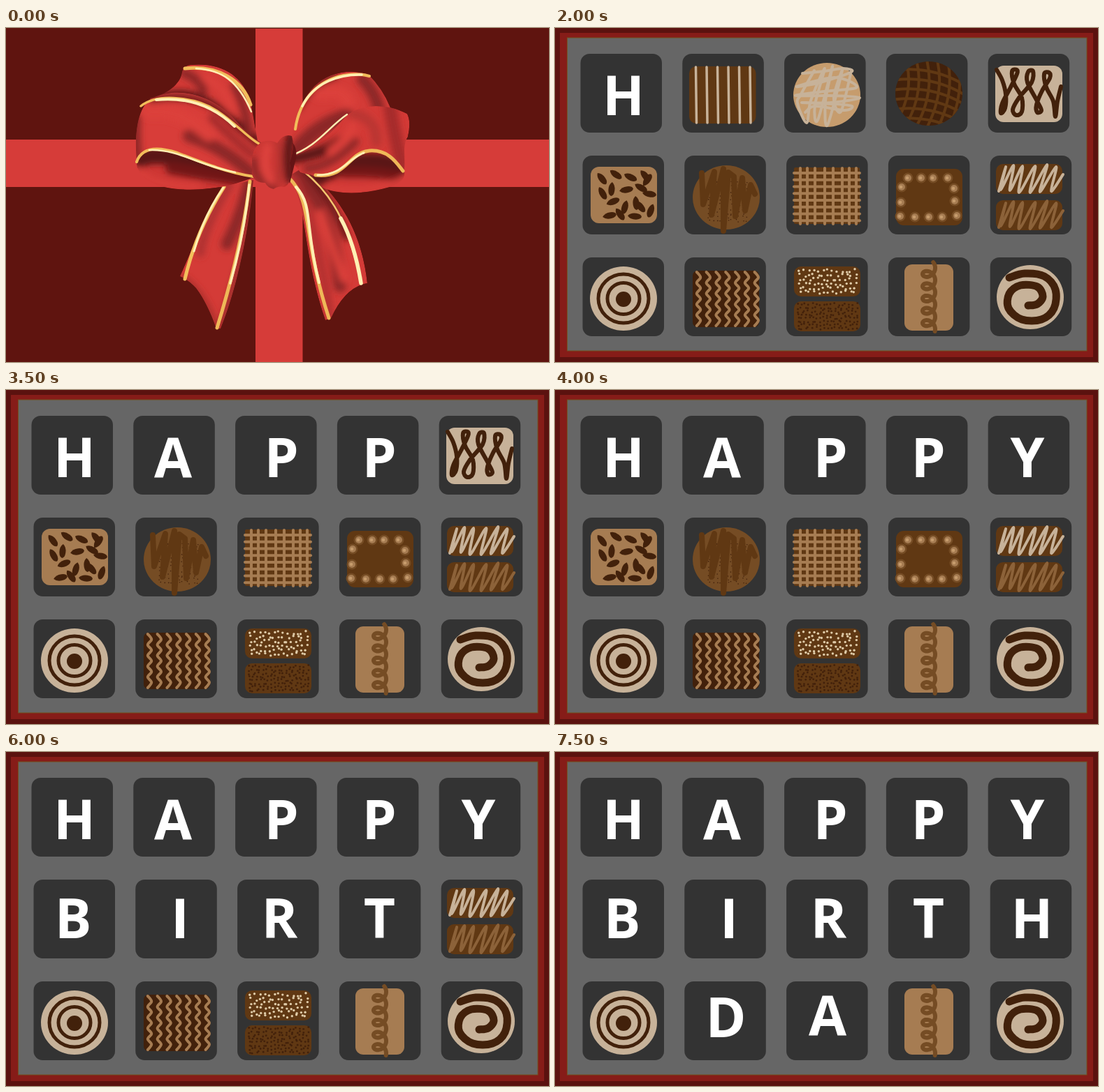
Write an HTML page that moves like this. It is 777x479 px and loops after 8 s.

```html
<!DOCTYPE html>
<html lang="en">
<head>
<meta charset="utf-8">
<title>Happy Birthday</title>
<style>
  html, body { margin: 0; width: 100%; height: 100%; overflow: hidden; background: #5f140f; }
  svg { display: block; width: 100%; height: 100%; }
  text { font: 700 78.4px "Open Sans", "Noto Sans", sans-serif; text-anchor: middle; fill: #fff; }
</style>
</head>
<body>
<svg id="stage" viewBox="0 0 777 479" preserveAspectRatio="none"></svg>
<script>
const LOOP = 8000, BOX_OPENS = 1000, FIRST_LETTER = 2000, LETTER_STEP = 500;
const DARK = '#42210b', BROWN = '#603813', MID = '#754c24', TAN = '#a67c52', GOLD = '#c69c6d', CREAM = '#c7b299';

// Catmull-Rom curve through "x,y x,y ..." points
function smooth(points) {
  const p = typeof points === 'string' ? points.split(' ').map(s => s.split(',').map(Number)) : points;
  let d = 'M' + p[0];
  for (let i = 0; i < p.length - 1; i++) {
    const a = p[i - 1] || p[i], b = p[i], c = p[i + 1], e = p[i + 2] || c;
    d += `C${b[0] + (c[0] - a[0]) / 6},${b[1] + (c[1] - a[1]) / 6} ` +
         `${c[0] - (e[0] - b[0]) / 6},${c[1] - (e[1] - b[1]) / 6} ${c}`;
  }
  return d;
}
const range = n => [...Array(n).keys()];
const list = (n, f) => range(n).map(f).join('');
const noise = n => { const v = Math.sin(n * 12.9898) * 43758.5453; return v - Math.floor(v); };
const rect = (x, y, w, h, r, fill) => `<rect x="${x}" y="${y}" width="${w}" height="${h}" rx="${r}" fill="${fill}"/>`;
const oval = (x, y, rx, ry, fill) => `<ellipse cx="${x}" cy="${y}" rx="${rx}" ry="${ry}" fill="${fill}"/>`;
const line = (d, color, width) =>
  `<path d="${d}" fill="none" stroke="${color}" stroke-width="${width}" stroke-linecap="round" stroke-linejoin="round"/>`;
const fillPath = (d, fill) => `<path d="${d}" fill="${fill}"/>`;

let clipCount = 0;
function clipped(d, content) {
  const id = 'clip' + clipCount++;
  return `<clipPath id="${id}"><path d="${d}"/></clipPath><g clip-path="url(#${id})">${content}</g>`;
}
// A flat shape with soft strokes of shade inside it
const shaded = (d, fill, shades) => clipped(d, fillPath(d, fill) +
  `<g filter="url(#soft)">${shades.map(s => line(...s)).join('')}</g>`);

// Evenly scattered dots: one per jittered cell
function sprinkle(x, y, w, h, cols, rows, r, fill) {
  return list(cols * rows, i => {
    const cx = x + (i % cols + 0.1 + 0.8 * noise(i + x)) * w / cols;
    const cy = y + (Math.floor(i / cols) + 0.1 + 0.8 * noise(i * 3 + y)) * h / rows;
    return `<circle cx="${cx.toFixed(1)}" cy="${cy.toFixed(1)}" r="${r}" fill="${fill}"/>`;
  });
}

function giftBow() {
  const shade = '#8c2526', deep = '#5a1213', light = '#dc403b';
  const leftTail = 'M312,227C286,263 272,305 249,356Q261,361 272,373Q288,394 301,431L307,431C327,384 347,300 354,218Z';
  const rightTail = 'M404,213C432,250 422,315 457,419L465,416Q486,371 517,366C510,300 482,242 425,200Z';
  const backLeft = 'M205,101C230,96 250,80 252,63Q254,54 264,53C309,49 338,68 350,105L360,162L325,150Z';
  const frontLeft = 'M188,201C183,160 186,115 208,101C253,80 302,101 330,134Q350,157 367,165L354,216C290,220 230,180 188,201Z';
  const openLeft = 'M187,194C190,170 222,168 250,180C288,194 320,207 357,212Q345,219 318,226C270,236 192,237 187,194Z';
  const backRight = 'M408,160C415,120 429,83 465,68Q493,58 519,67Q539,87 550,114L500,170L405,190Z';
  const frontRight = 'M405,186C444,176 469,145 487,126C508,108 545,108 574,123Q580,134 575,156C566,170 573,187 569,209C546,170 510,170 490,190C467,214 445,215 421,207Z';
  const openRight = 'M437,212C480,217 492,179 517,176C543,172 564,192 570,207Q572,220 549,228C512,239 475,239 453,229Z';
  const knot = 'M352,193Q351,171 367,163Q379,159 388,165Q397,151 409,155Q414,172 406,193Q411,221 399,228Q389,226 383,231Q374,229 371,222Q355,222 352,210Z';
  return rect(0, 0, 777, 479, 0, '#5f140f') +
    rect(357, 1, 67.5, 478, 0, '#d63c39') + rect(0, 160, 777, 68, 0, '#d63c39') +
    shaded(leftTail, '#d43b37', [
      ['M350,215Q337,270 316,310', shade, 17], ['M320,224Q283,285 278,323', '#ae3030', 12],
      ['M252,358Q280,375 300,427', '#a82e2c', 9], ['M354,220Q344,318 307,429', deep, 4]]) +
    line('M312,228Q272,291 256,360', '#f3c05c', 5) + line('M311,229Q283,269 269,320', '#fff0b4', 3) +
    line('M349,220Q338,313 302,430', '#efb858', 5) + line('M348,225Q341,296 321,366', '#fff0b4', 3.5) +
    shaded(rightTail, '#d43b37', [
      ['M415,205Q466,259 478,370', shade, 18], ['M413,215Q443,275 464,414', '#ad2d2d', 10],
      ['M427,203Q465,241 487,300', deep, 9], ['M450,265Q469,320 483,360', light, 11]]) +
    line('M405,215C440,249 423,296 462,416', '#efb858', 5) + line('M415,228C440,254 427,285 448,365', '#fff0b4', 4) +
    line('M424,204C478,246 491,296 509,366', '#f3c870', 2.5) + line('M479,273Q499,310 508,366', '#fff0b4', 5.5) +
    shaded(backLeft, '#d43b37', [
      ['M215,106Q264,84 311,127L356,162', deep, 19], ['M254,64Q278,74 282,90', shade, 13],
      ['M327,83Q342,110 348,151', shade, 12], ['M285,72Q314,84 323,117', light, 12]]) +
    line('M256,58C303,53 339,75 350,110', '#f2bd5b', 5) + line('M272,58C308,60 332,75 351,120', '#fff0b4', 2.5) +
    shaded(frontLeft, '#d83d39', [
      ['M186,130Q184,168 190,201', shade, 14], ['M209,103Q284,88 327,139L362,167', deep, 8],
      ['M262,155Q306,168 351,208', shade, 18], ['M295,129Q330,165 354,182', '#a42c2c', 12],
      ['M205,120Q250,116 290,153', light, 20]]) +
    line('M193,112C218,92 274,100 302,119C329,137 347,158 362,166', '#f2bd5b', 3.5) +
    line('M215,103C264,98 300,115 327,141', '#fff0b4', 4) +
    shaded(openLeft, '#ce3734', [
      ['M193,187Q222,172 348,213', deep, 25], ['M237,201Q287,210 338,218', '#721819', 18],
      ['M190,205Q210,227 275,228', light, 8]]) +
    line('M187,192C195,169 220,171 245,179C286,195 316,207 354,213', '#f2bd5b', 4) +
    line('M205,175C246,173 275,197 328,207', '#fff0b4', 2.5) +
    shaded(backRight, '#d43b37', [
      ['M414,178Q441,141 487,127', shade, 22], ['M510,73Q530,94 534,119', shade, 17],
      ['M418,114Q438,80 472,70', deep, 7], ['M450,94Q482,86 490,106', light, 20]]) +
    line('M414,145C420,101 448,75 483,68Q503,64 520,69', '#f2bd5b', 4) +
    line('M424,112C441,77 479,66 509,67', '#fff0b4', 3.5) +
    shaded(frontRight, '#d33a36', [
      ['M408,187Q452,181 478,163', deep, 16], ['M430,202Q465,199 500,163', shade, 11],
      ['M549,110Q556,154 568,203', '#a62c2c', 19], ['M495,123Q531,128 530,164', '#b93432', 14],
      ['M465,177Q494,155 496,140', light, 13]]) +
    line('M405,184C447,169 460,143 488,124', '#fff0b4', 2.5) +
    shaded(openRight, '#ce3734', [
      ['M445,216Q510,176 564,199', deep, 23], ['M485,207Q527,206 559,212', '#741819', 15],
      ['M460,229Q521,239 570,216', light, 8]]) +
    line('M443,211C488,216 489,179 520,176C548,174 560,195 568,205', '#efb858', 5) +
    line('M446,211C482,211 489,187 512,179', '#fff0b4', 3) +
    fillPath('M401,157Q418,166 415,187L406,223Q395,190 401,157Z', '#651415') +
    shaded(knot, '#c93633', [
      ['M354,190Q354,218 383,231', shade, 11], ['M408,155Q401,182 407,216', deep, 14],
      ['M374,171Q367,199 378,218', '#de423d', 13], ['M390,164Q397,185 390,220', '#ae302e', 7]]);
}

function chocolates() {
  const seeds = [[67,216,52],[87,210,35],[108,214,25],[129,212,50],[132,218,-55],[68,237,60],[81,231,95],
    [102,232,-10],[123,229,30],[135,238,8],[83,249,-22],[116,251,85],[100,257,105],[122,256,50],
    [78,269,-12],[93,267,55],[114,270,5],[137,262,110]];
  const pearls = [[505,215],[524,215],[541,215],[562,215],[571,230],[572,248],[575,269],[554,271],[535,271],
    [515,271],[494,270],[495,250],[496,228]];
  const zigzag = line(smooth('635,234 645,199 638,232 656,197 651,233 669,198 664,236 687,198 680,236 704,196 694,235 717,199 710,234 727,210'), 'currentColor', 4);
  const disc = 'M487,94a48,46 0 1 0 96,0a48,46 0 1 0 -96,0';
  const coil = range(131).map(i => {
    const a = -0.8 + i * 0.25;
    return [535 + 9 * Math.cos(a), 344 + 2.8 * a + 8 * Math.sin(a)];
  });
  return [
    oval(94.5, 96, 52, 50, MID) + line(smooth('63,66 77,55 96,54 118,67 130,92 127,115 112,127 85,123 63,106 57,86 68,71 90,67 108,80 113,96 105,109 88,108 77,96 84,87 93,89 97,98 91,96'), GOLD, 4),

    rect(192, 55, 95.5, 82, 10, BROWN) + list(6, i => line(`M${201.5 + i * 15.5},56l1,80`, CREAM, 3.5)),

    oval(389, 96, 48, 46, GOLD) +
      line(smooth('371,61 352,95 347,108 360,136 366,104 386,58 372,110 376,132 397,55 387,105 390,139 411,61 399,100 409,120 423,66'), CREAM, 4) +
      line(smooth('354,65 385,62 412,58 424,63 380,78 346,84 400,71 432,85 385,91 344,97 390,97 436,100 395,107 353,107 400,109 425,112 414,118 372,112 358,121'), CREAM, 4),

    fillPath(disc, DARK) + clipped(disc,
      list(6, i => line(`M${501 + i * 15},42Q${517 + i * 14},92 ${483 + i * 16},145`, BROWN, 4)) +
      list(6, i => line(`M482,${61 + i * 14}Q540,${53 + i * 14} 588,${83 + i * 14}`, BROWN, 4))),

    rect(630, 54, 96, 81, 12, CREAM) + line(smooth('632,60 640,75 645,95 644,115 638,122 640,108 652,85 661,66 661,60 654,62 657,80 668,100 668,120 660,125 655,117 664,100 682,78 684,62 677,63 676,78 690,105 696,118 690,121 689,110 697,90 708,72 707,64 700,66 703,85 713,105 716,127 719,105 724,84'), DARK, 6),

    rect(51, 199, 95, 81, 12, TAN) + seeds.map(([x, y, turn]) =>
      `<path transform="translate(${x} ${y}) rotate(${turn})" d="M-10,0Q-6,-5 2,-4.5Q9,-4 10,0Q9,4 2,4.5Q-6,5 -10,0Z" fill="${DARK}"/>`).join(''),

    oval(245, 243, 48, 46, MID) + sprinkle(218, 217, 58, 62, 11, 11, 0.8, DARK) +
      line('M210,208L212,253L228,206L224,268L241,202L241,291L248,207L256,213L258,270L268,215L272,262L280,225L286,238', BROWN, 8),

    rect(342, 200, 94, 81, 2, BROWN) +
      [351, 361, 372, 386, 398, 411, 421, 431].map(x => line(`M${x},201V281`, TAN, 4)).join('') +
      list(8, i => line(`M342,${208 + i * 9.75}H436`, TAN, 4)),

    rect(488, 202, 95, 81, 11, BROWN) + pearls.map(([x, y]) =>
      oval(x, y, 7.5, 7.5, MID) + oval(x, y, 5, 5, TAN) + oval(x - 1, y, 2.3, 2.3, GOLD)).join(''),

    rect(631, 195, 95, 43, 10, BROWN) + rect(631, 247, 95, 43, 10, BROWN) +
      `<g color="${CREAM}">${zigzag}</g><g color="#8c6239" transform="translate(0 52)">${zigzag}</g>`,

    oval(98, 388, 48, 46, CREAM) + line('M62,388a36,35 0 1 0 72,0a36,35 0 1 0 -72,0M75,388a23,22.5 0 1 0 46,0a23,22.5 0 1 0 -46,0', DARK, 5) + oval(98, 389, 11, 11, DARK),

    rect(197, 348, 95, 81, 7, DARK) + list(7, i =>
      line(smooth(range(11).map(k => [205.5 + i * 13.8 + (k % 2 ? 2.7 : -2.7), 350 + k * 7.7])), TAN, 4)),

    rect(342, 342, 95, 43, 10, BROWN) + rect(342, 392, 95, 43, 10, BROWN) +
      sprinkle(347, 345, 86, 37, 13, 6, 1.7, '#dfcba8') + sprinkle(345, 394, 89, 39, 17, 8, 1.4, DARK),

    rect(500, 339, 70, 95, 11, TAN) + line(smooth(coil), MID, 6),

    oval(680, 386, 48, 46, CREAM) + line(smooth('650,358 672,352 700,356 716,375 714,402 696,418 668,418 649,402 650,381 666,369 690,371 698,385 690,396 677,398'), DARK, 11)
  ];
}

// [character, x, baseline] in reading order
const letters = [['H', 98, 125], ['A', 239, 125], ['P', 394, 125], ['P', 534, 125], ['Y', 676, 125],
  ['B', 96, 267], ['I', 249, 267], ['R', 391.5, 267], ['T', 534.5, 267], ['H', 682.5, 267],
  ['D', 244.5, 409], ['A', 390, 406]];
// The first sweet of the bottom row stays in its place
const letterTiles = [0, 1, 2, 3, 4, 5, 6, 7, 8, 9, 11, 12];

const tiles = list(15, i => {
  const row = Math.floor(i / 5);
  return rect((row ? 39.5 : 36.5) + i % 5 * 145.8, 37 + row * 146, 116.5, 113, 13, '#333');
});

const stage = document.getElementById('stage');
stage.innerHTML = '<defs><filter id="soft" filterUnits="userSpaceOnUse" x="150" y="20" width="460" height="440"><feGaussianBlur stdDeviation="5"/></filter></defs>' +
  `<g id="box">${rect(0, 0, 777, 479, 0, '#5b120f')}${rect(7, 7, 763, 465, 0, '#861c18')}` +
  `<rect x="17.5" y="14" width="743.5" height="449" fill="#666" stroke="#75501f"/>${tiles}` +
  chocolates().map(c => `<g class="sweet">${c}</g>`).join('') +
  letters.map(([c, x, y]) => `<text x="${x}" y="${y}">${c}</text>`).join('') +
  `</g><g id="bow">${giftBow()}</g>`;

const box = document.getElementById('box'), bow = document.getElementById('bow');
const sweets = stage.querySelectorAll('.sweet'), texts = stage.querySelectorAll('text');
const show = (node, on) => { node.style.display = on ? '' : 'none'; };

function draw() {
  const time = performance.now() % LOOP;
  show(bow, time < BOX_OPENS);
  show(box, time >= BOX_OPENS);
  texts.forEach((text, i) => {
    const revealed = time >= FIRST_LETTER + i * LETTER_STEP;
    show(text, revealed);
    show(sweets[letterTiles[i]], !revealed);
  });
  requestAnimationFrame(draw);
}
draw();
</script>
</body>
</html>
```
